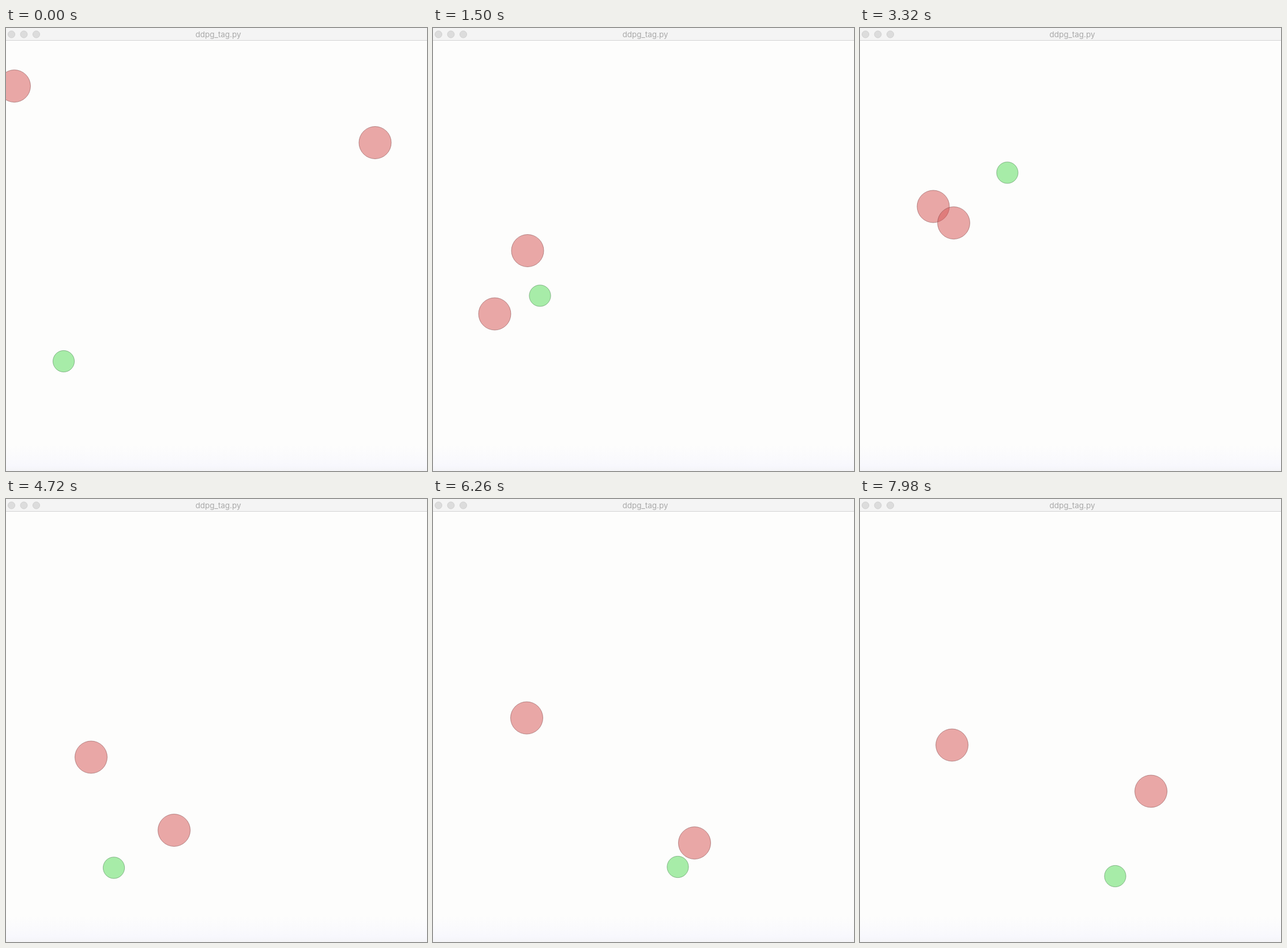
Write an HTML page that moves like this. It is 730 by 767 pixels and loops after 8000 ms.

```html
<!DOCTYPE html>
<html lang="en">
<head>
<meta charset="utf-8">
<title>ddpg_tag.py</title>
<style>
  html, body { margin: 0; width: 100%; height: 100%; overflow: hidden; background: #fdfdfc; }
  svg { display: block; width: 730px; height: 767px; }
  .title { font: 13.5px Inter, "Open Sans", sans-serif; fill: #a9a9a9; text-anchor: middle; }
  .button { fill: #dcdcdc; stroke: #d0d0d0; }
  .chaser { fill: rgba(213, 83, 83, .5); stroke: rgba(125, 60, 60, .5); }
  .runner { fill: rgba(83, 219, 87, .5); stroke: rgba(65, 125, 70, .5); }
</style>
</head>
<body>
<svg viewBox="0 0 730 767">
  <defs>
    <linearGradient id="floor" x2="0" y2="1">
      <stop offset="0" stop-color="#fdfdfc"/>
      <stop offset=".8" stop-color="#f8f8fd"/>
      <stop offset="1" stop-color="#f4f4f7"/>
    </linearGradient>
  </defs>
  <rect width="730" height="767" fill="#fdfdfc"/>
  <rect y="722" width="730" height="45" fill="url(#floor)"/>
  <circle class="chaser" id="chaserA" r="28"/>
  <circle class="chaser" id="chaserB" r="28"/>
  <circle class="runner" id="runner" r="18.6"/>
  <rect width="730" height="22" fill="#f4f4f4"/>
  <rect y="21" width="730" height="1" fill="#d4d4d4"/>
  <circle class="button" cx="9.5" cy="11" r="6"/>
  <circle class="button" cx="31" cy="11" r="6"/>
  <circle class="button" cx="52.5" cy="11" r="6"/>
  <text class="title" x="368" y="16">ddpg_tag.py</text>
</svg>
<script>
const LOOP = 8000;
const knots = [0, 31, 49, 70, 100, 133, 171];
const paths = {
  chaserA: [[14.5, 100.5], [107, 495], [128.5, 464.5], [127, 309], [147.5, 447], [162.5, 379], [159.5, 426]],
  chaserB: [[640, 198.5], [164, 385.5], [529.5, 352], [162.5, 337.5], [291.5, 573.5], [453.5, 595.5], [504.5, 506]],
  runner: [[100, 577], [185.5, 463.5], [521, 574.5], [255.5, 250.5], [187, 638.5], [424.5, 637], [442.5, 653]]
};

// The display advances in groups of three steps: 100, 20 and 20 ms.
function stepAt(ms) {
  const rest = ms % 140;
  return Math.floor(ms / 140) * 3 + (rest >= 120 ? 2 : rest >= 100 ? 1 : 0);
}

function slope(points, i, axis) {
  const a = Math.max(i - 1, 0), b = Math.min(i + 1, points.length - 1);
  return (points[b][axis] - points[a][axis]) / (knots[b] - knots[a]);
}

// Cubic Hermite curve through the path points.
function position(points, step, axis) {
  let i = 0;
  while (i < knots.length - 2 && step >= knots[i + 1]) i++;
  const span = knots[i + 1] - knots[i];
  const u = (step - knots[i]) / span, v = 1 - u;
  return v * v * (1 + 2 * u) * points[i][axis]
    + u * u * (3 - 2 * u) * points[i + 1][axis]
    + u * v * span * (v * slope(points, i, axis) - u * slope(points, i + 1, axis));
}

function draw() {
  const step = stepAt(performance.now() % LOOP);
  for (const [id, points] of Object.entries(paths)) {
    const disc = document.getElementById(id);
    disc.setAttribute("cx", position(points, step, 0));
    disc.setAttribute("cy", position(points, step, 1));
  }
  requestAnimationFrame(draw);
}
draw();
</script>
</body>
</html>
```
